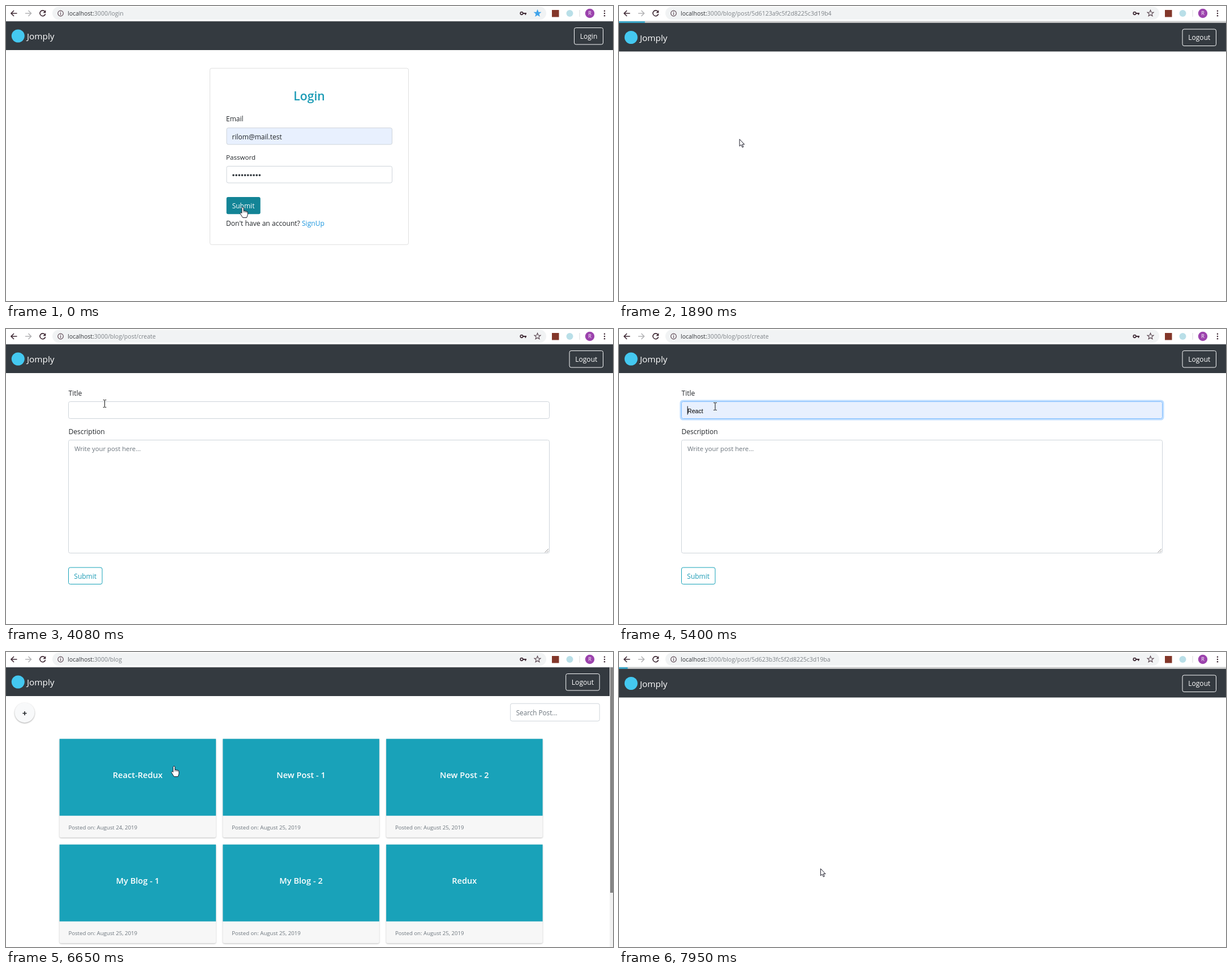
Animation of 1073x522 px, one loop 8 s. Source, as an HTML page:

```html
<!DOCTYPE html>
<html lang="en">
<head>
<meta charset="utf-8">
<title>Blog demo</title>
<style>
  html, body { margin: 0; width: 100%; height: 100%; overflow: hidden; background: #fff; }
  svg { display: block; width: 100vw; height: 100vh; }
  text { font-family: "Open Sans", "Noto Sans", sans-serif; white-space: pre; }
  .card { filter: drop-shadow(0 1px 1.2px rgba(0,0,0,.26)); }
  .card.hover { filter: drop-shadow(0 1.5px 2px rgba(0,0,0,.42)); }
  .plus { filter: drop-shadow(0 1px 1.2px rgba(0,0,0,.35)); }
</style>
</head>
<body>
<svg id="stage" viewBox="0 0 1073 522" xmlns="http://www.w3.org/2000/svg"></svg>
<script>
const LOOP = 8000;
const TEAL = '#17a2b8', INK = '#212529', MUTED = '#6c757d', EDGE = '#ced4da';
const BRAND = 'Jomply';

// Markup helpers
const text = (x, y, s, size = 12, fill = INK, more = '') =>
  `<text x="${x}" y="${y}" font-size="${size}" fill="${fill}" ${more}>${s}</text>`;
const mid = 'text-anchor="middle"';
const rect = (x, y, w, h, fill, more = '') =>
  `<rect x="${x}" y="${y}" width="${w}" height="${h}" fill="${fill}" ${more}/>`;
const box = (x, y, w, h, fill, stroke, more = '') =>
  rect(x, y, w, h, fill, `rx="3" stroke="${stroke}" ${more}`);
const line = (d, stroke, width = 1.6, more = '') =>
  `<path d="${d}" fill="none" stroke="${stroke}" stroke-width="${width}" ${more}/>`;
const circle = (x, y, r, fill, more = '') =>
  `<circle cx="${x}" cy="${y}" r="${r}" fill="${fill}" ${more}/>`;
const group = (id, body, more = '') => `<g id="${id}" ${more}>${body}</g>`;
const ring = (id, x, y, w, h, color) =>
  rect(x - 1.5, y - 1.5, w + 3, h + 3, 'none', `id="${id}" rx="4" stroke="${color}" stroke-width="3"`);

function starPath(cx, cy, outer, inner) {
  const points = Array.from({ length: 10 }, (_, i) => {
    const r = i % 2 ? inner : outer, a = i * Math.PI / 5 - Math.PI / 2;
    return `${(cx + r * Math.cos(a)).toFixed(2)} ${(cy + r * Math.sin(a)).toFixed(2)}`;
  });
  return `M${points.join('L')}Z`;
}

const chromeBar = () => {
  const dark = '#3f2a35';
  return rect(0, 0, 1073, 27, '#fff') + rect(0, 26.4, 1073, .8, '#d5d7d9') +
    rect(82, 1.5, 873, 22.5, '#f1f3f4', 'rx="11.2"') +
    line('M19.5 13H9.5M14 8L9 13L14 18', dark) +
    line('M34 13H44M39.5 8L44.5 13L39.5 18', '#b4b4b6') +
    line('M68.6 9.6A4.9 4.9 0 1 0 69.6 14', dark) +
    `<path d="M70.3 7.2V12.2H65.3Z" fill="${dark}"/>` +
    circle(96.5, 13, 4.8, 'none', `stroke="#5f4a55" stroke-width="1.2"`) +
    line('M96.5 12.3V15.7M96.5 10.1V11.3', '#5f4a55', 1.3) +
    `<text x="109" y="17" font-size="10.53" fill="#7d8287"><tspan fill="#33363a">localhost:</tspan><tspan id="path"></tspan></text>` +
    circle(911.5, 13, 2.3, 'none', `stroke="${dark}" stroke-width="1.7"`) +
    line('M914 13H920M918.3 13V15.8', dark, 1.9) +
    `<path id="star" d="${starPath(939.5, 13, 5.8, 2.5)}" stroke-width="1.1"/>` +
    rect(965, 7, 12.5, 12.5, '#83372a') + circle(996.5, 13, 6, '#b9dfe8') +
    rect(1013.5, 7, 1, 12, '#d9dadc') + circle(1032, 13, 8.2, '#9c43ad') +
    text(1032, 16.3, 'R', 9, '#fff', mid) +
    [8.7, 13, 17.3].map(y => circle(1058, y, 1.25, dark)).join('');
};

const navButton = (id, x, w, label) => group(id,
  box(x, 38.5, w, 29.5, 'none', '#f8f9fa') + text(x + w / 2, 57.7, label, 12.1, '#fff', mid));

const nav = () => rect(0, 27, 1073, 51, '#343a40') + circle(21.3, 53, 11.5, '#44c8f0') +
  text(37, 59.2, BRAND, 15.3, '#fff') +
  navButton('signIn', 1004.5, 51, 'Login') + navButton('signOut', 996, 59.5, 'Logout');

const login = () => box(360.5, 110.2, 351, 312, '#fff', '#dfdfdf') +
  text(536, 167, 'Login', 21.2, '#1b9bb5', mid + ' font-weight="600"') +
  text(389, 204, 'Email') + box(390, 215.7, 292.5, 29.3, '#e8f0fe', EDGE) +
  text(399.5, 235.6, 'rilom@mail.test') +
  text(389, 272, 'Password', 11.6) + box(390, 283.5, 292.5, 29.5, '#fff', EDGE) +
  line('M402 299.3H449', '#343a40', 3.7, 'stroke-linecap="round" stroke-dasharray="0 5.15"') +
  rect(389.7, 338, 60, 30.3, '#138496', 'rx="3"') + text(419.5, 357.8, 'Submit', 12, '#fff', mid) +
  text(389, 388.7, `Don't have an account? <tspan fill="#1d97df">SignUp</tspan>`, 12.1);

const posts = ['React-Redux', 'New Post - 1', 'New Post - 2', 'My Blog - 1', 'My Blog - 2', 'Redux', 'React'];
const card = (title, i) => {
  const x = 97.7 + i % 3 * 288.75, y = 153.7 + Math.floor(i / 3) * 187;
  return group('card' + i,
    rect(x, y, 276.5, 174.5, '#f7f7f7', 'rx="3"') + rect(x, y, 276.5, 136, '#19a2b9') +
    text(x + 138.2, y + 69, title, 14.6, '#fff', mid + ' font-weight="600"') +
    text(x + 15.8, y + 160, `Posted on: August ${i ? 25 : 24}, 2019`, 9.65, MUTED), 'class="card"');
};
const blog = () =>
  circle(33, 107.3, 17.6, '#f8f9fa', 'class="plus"') +
  line('M29.4 108.5H36.6M33 104.9V112.1', INK, 1.6) +
  group('search', box(898, 91.2, 157.5, 31, '#fff', EDGE) + text(908, 112, 'Search Post...', 11.7, MUTED)) +
  group('cards', posts.map(card).join(''));

const create = () => text(110.5, 117.5, 'Title') +
  ring('titleRing', 110.5, 128.5, 850, 30, '#bfdeff') +
  box(110.5, 128.5, 850, 30, '#fff', EDGE, 'id="titleBox"') +
  text(121, 149, 'React', 10.6, '#000', 'id="preview" style="font-family:\'Liberation Sans\',Arial,sans-serif"') +
  text(121, 148.7, 'React', 12, INK, 'id="typed"') +
  rect(120.7, 136.5, 1, 15, '#000', 'id="titleCaret"') +
  text(110.5, 185.5, 'Description') +
  ring('bodyRing', 110.5, 196.5, 850, 200, '#bfdeff') +
  box(110.5, 196.5, 850, 200, '#fff', EDGE, 'id="bodyBox"') +
  text(121, 216, 'Write your post here...', 11.3, MUTED) +
  rect(120.7, 204, 1, 15, '#000', 'id="bodyCaret"') +
  line('M952.5 395.5L959 389M956 395.5L959 392.5', '#777', .8) +
  ring('submitRing', 110.5, 422, 59.5, 29.5, '#8bd0db') +
  box(110.5, 422, 59.5, 29.5, '#fff', TEAL) + text(140.2, 441.5, 'Submit', 12, '#1b9bb5', mid) +
  group('popup', box(111, 160.5, 849, 69, '#fff', '#c8c8c8') +
    rect(111.5, 166, 848, 28, '#ececec', 'id="choice"') +
    text(121, 184, 'React', 11) + text(121, 212, 'Redux', 11));

const post = () => text(536, 122, 'React-Redux', 19, '#1b9bb5', mid + ' font-weight="600"');

const pointer = 'fill="#fff" stroke="#1a1a28" stroke-width="1" stroke-linejoin="round"';
const cursors = {
  arrow: `<path ${pointer} d="M.4 .4V12.8L3.2 10.2 5.3 14.8 7.2 14 5.2 9.6H9Z"/>`,
  hand: `<path ${pointer} d="M-1.6 1.6a1.6 1.6 0 0 1 3.2 0V6.2L6.8 7.3Q8.8 7.8 8.8 9.8V13.2L7 18.5H0L-4.2 11.8Q-5 10.2-3.6 9.5-2.6 9.3-1.6 10.6Z"/>` +
    line('M1.6 6.2V9.5M4.2 7V9.8M6.7 7.4V10.2', '#1a1a28', .7),
  beam: line('M-2.8 -6.5H-.7L0 -5.8L.7 -6.5H2.8M0 -5.8V5.8M-2.8 6.5H-.7L0 5.8L.7 6.5H2.8', '#111', 1)
};

document.getElementById('stage').innerHTML = rect(0, 0, 1073, 522, '#fff') +
  group('view', group('nav', nav()) + group('login', login()) + group('blog', blog()) +
    group('create', create()) + group('post', post())) +
  group('loader', rect(0, 27, 1073, 2.7, '#c9c9c9') + rect(0, 27, 0, 2.7, '#229fc6', 'id="progress"')) +
  group('scrollbar', rect(1067, 27, 6, 495, '#f1f1f1') + rect(1068, 27, 5, 399, '#858585', 'id="thumb"')) +
  chromeBar() +
  group('cursor', Object.entries(cursors).map(([id, shape]) => group(id, shape)).join(''));

const el = Object.fromEntries([...document.querySelectorAll('[id]')].map(n => [n.id, n]));
const show = (id, on) => el[id].setAttribute('visibility', on ? 'inherit' : 'hidden');
const set = (id, name, value) => el[id].setAttribute(name, value);

// start, page, path, loading
const scenes = [
  [0, 'login', '/login', false],
  [300, 'login', '/login', true],
  [600, 'blog', '/blog', true],
  [900, 'blog', '/blog', false],
  [1650, 'post', '/blog/post/5d6123a9c5f2d8225c3d19b4', true],
  [2050, 'post', '/blog/post/5d6123a9c5f2d8225c3d19b4', false],
  [2610, 'blog', '/blog', false],
  [3320, 'create', '/blog/post/create', false],
  [6270, 'blog', '/blog', true],
  [6510, 'blog', '/blog', false],
  [7870, 'post', '/blog/post/5d623b3fc5f2d8225c3d19ba', true]
];

// time, x, y, shape
const moves = [
  [0, 418.5, 356, 'hand'], [600, 418.5, 356, 'arrow'], [900, 290, 270, 'hand'],
  [1150, 212.7, 235.3, 'hand'], [1650, 212.7, 235.3, 'arrow'], [1900, 212.7, 235.3, 'arrow'],
  [2340, 48.8, 53, 'hand'], [2370, 48.8, 53, 'hand'], [2440, 48.8, 60, 'hand'],
  [2610, 48.8, 60, 'arrow'], [2740, 76, 88, 'arrow'], [2920, 76, 88, 'arrow'],
  [3060, 43.6, 92, 'hand'], [3320, 43.6, 92, 'arrow'], [3700, 160, 130, 'beam'],
  [3790, 174.5, 132, 'beam'], [4080, 174.5, 132, 'beam'], [4160, 170, 137, 'beam'],
  [6270, 170, 137, 'arrow'], [6510, 275, 192, 'hand'], [6620, 297, 202, 'hand'],
  [6740, 297, 202, 'hand'], [7020, 520, 350, 'arrow'], [7110, 531, 362, 'arrow'],
  [7270, 531, 362, 'arrow'], [7600, 371, 381, 'hand'], [7690, 356, 383, 'hand'],
  [7870, 356, 383, 'arrow'], [LOOP, 356, 383, 'arrow']
];

const ramp = (t, a, b) => Math.min(1, Math.max(0, (t - a) / (b - a)));
const within = (t, a, b) => t >= a && t < b;
const indexAt = (rows, t) => rows.findLastIndex(row => row[0] <= t);

function drawFocus(t) {
  const title = ramp(t, 4310, 4460) - ramp(t, 5560, 5710);
  const body = ramp(t, 5560, 5710) - ramp(t, 5880, 5960);
  set('titleRing', 'opacity', title);
  set('bodyRing', 'opacity', body);
  set('submitRing', 'opacity', ramp(t, 5880, 5960));
  set('titleBox', 'stroke', title > .5 ? '#80bdff' : EDGE);
  set('bodyBox', 'stroke', body > .5 ? '#80bdff' : EDGE);
}

function drawForm(t) {
  drawFocus(t);
  set('titleBox', 'fill', t >= 5170 ? '#e8f0fe' : '#fff');
  show('preview', within(t, 5170, 5490));
  show('typed', t >= 5490);
  show('titleCaret', within(t, 4360, 4860) || within(t, 5360, 5560));
  show('bodyCaret', within(t, 5640, 5880));
  show('popup', within(t, 4480, 5400));
  show('choice', t >= 5170);
}

function drawCursor(t) {
  const i = indexAt(moves, t);
  const [t0, x0, y0, shape] = moves[i], [t1, x1, y1] = moves[i + 1];
  const k = ramp(t, t0, t1);
  set('cursor', 'transform', `translate(${x0 + (x1 - x0) * k} ${y0 + (y1 - y0) * k})`);
  for (const name in cursors) show(name, name === shape);
}

function draw(t) {
  const [start, page, path, loading] = scenes[indexAt(scenes, t)];
  const long = within(t, 6510, 7870);
  const scroll = long ? 156 * (1 - (1 - ramp(t, 6760, 7130)) ** 2) : 0;
  for (const name of ['login', 'blog', 'create', 'post'])
    show(name, name === page && (!loading || page === 'login'));

  el.path.textContent = '3000' + path;
  const starred = page === 'login';
  set('star', 'fill', starred ? '#3fa3ea' : 'none');
  set('star', 'stroke', starred ? '#3fa3ea' : '#55404b');
  show('signIn', page === 'login');
  show('signOut', page !== 'login');

  show('loader', loading);
  set('progress', 'width', (t - start) * .19);
  set('view', 'transform', `translate(0 ${(loading ? 2.5 : 0) - scroll})`);

  show('scrollbar', long);
  set('thumb', 'y', 27 + scroll * .769);
  set('signOut', 'transform', `translate(${long ? -6.3 : 0} 0)`);
  set('search', 'transform', `translate(${long ? -6.3 : 0} 0)`);
  set('cards', 'transform', `translate(${long ? -3.1 : 0} 0)`);
  el.card6.style.display = long ? '' : 'none';
  el.card0.classList.toggle('hover', within(t, 1100, 1650));

  drawForm(t);
  drawCursor(t);
}

const began = performance.now();
function tick() {
  draw((performance.now() - began) % LOOP);
  requestAnimationFrame(tick);
}
tick();
</script>
</body>
</html>
```
